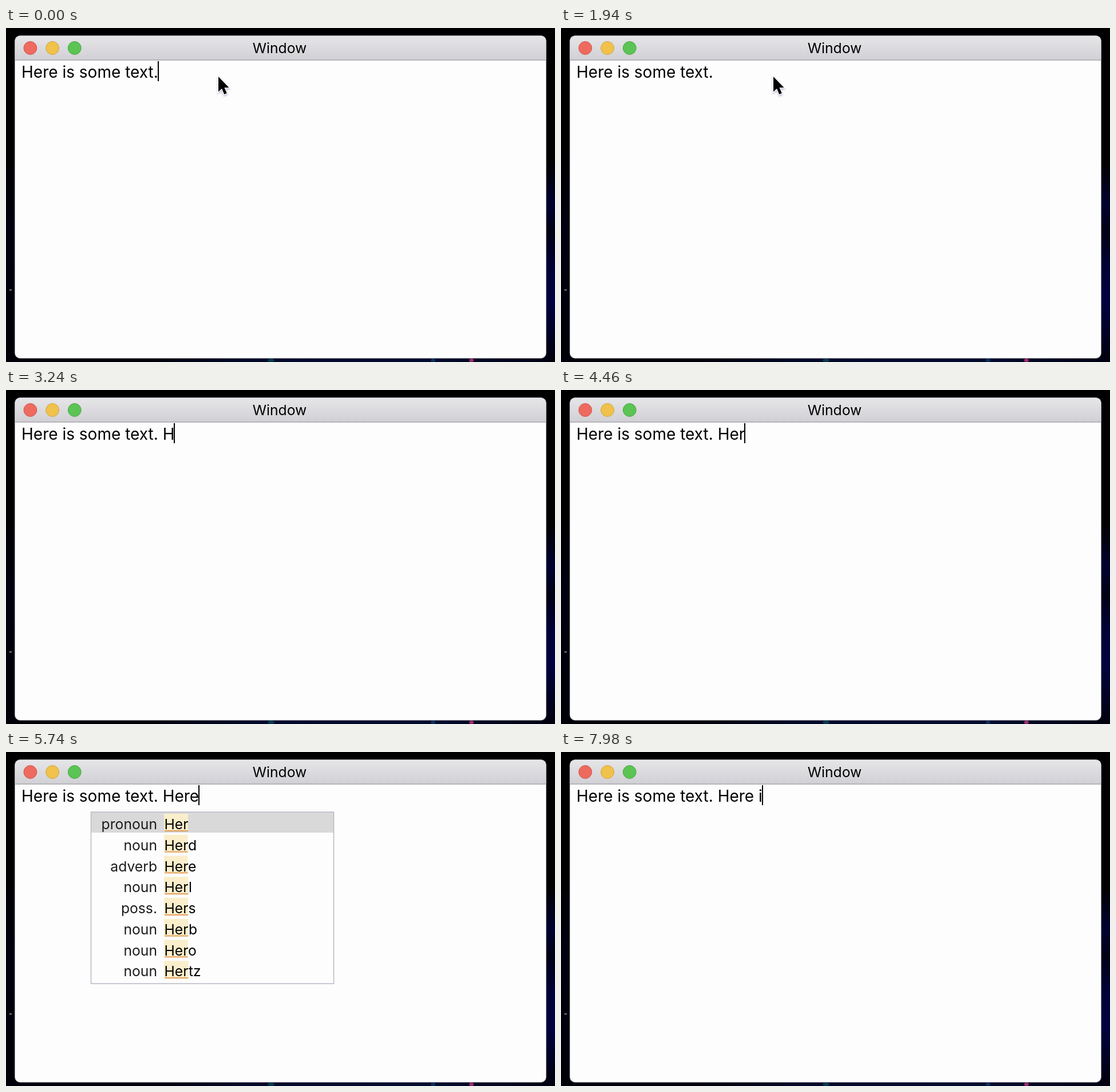
Write an HTML page that moves like this. It is 959x584 px and loops after 8000 ms.

```html
<!DOCTYPE html>
<html lang="en">
<head>
<meta charset="utf-8">
<title>Text completion</title>
<style>
  html, body { margin: 0; width: 100%; height: 100%; overflow: hidden; background: #000; }
  svg { display: block; width: 959px; height: 584px; }
  text { font-family: Inter, Roboto, sans-serif; font-optical-sizing: none; white-space: pre; }
  .title, .word { font-size: 24.7px; }
  .kind { font-size: 24.7px; fill: #1c1c1c; text-anchor: end; }
  #typed { font-size: 28px; }
</style>
</head>
<body>
<svg id="stage" viewBox="0 0 959 584">
  <defs>
    <linearGradient id="bar" x2="0" y2="1">
      <stop stop-color="#e6e5e8"/><stop offset="1" stop-color="#d1d0d4"/>
    </linearGradient>
    <linearGradient id="sky" x2="0" y2="1">
      <stop offset=".4" stop-color="#000"/><stop offset=".53" stop-color="#000030"/>
      <stop offset=".61" stop-color="#000014"/><stop offset=".72" stop-color="#000038"/>
      <stop offset=".82" stop-color="#000040"/><stop offset="1" stop-color="#00000c"/>
    </linearGradient>
    <linearGradient id="dusk" x2="0" y2="1">
      <stop offset=".35" stop-color="#000"/><stop offset=".6" stop-color="#000010"/>
      <stop offset="1" stop-color="#000008"/>
    </linearGradient>
    <linearGradient id="floor">
      <stop offset=".25" stop-color="#00000a"/><stop offset=".45" stop-color="#00082a"/>
      <stop offset=".8" stop-color="#000a2c"/><stop offset="1" stop-color="#000014"/>
    </linearGradient>
    <filter id="shade" x="-50%" y="-50%" width="200%" height="200%">
      <feDropShadow dx="0" dy="2" stdDeviation="1.5" flood-color="#77a" flood-opacity=".55"/>
    </filter>
  </defs>

  <rect width="959" height="584" fill="#000"/>
  <rect x="943" width="16" height="584" fill="url(#sky)"/>
  <rect width="16" height="584" fill="url(#dusk)"/>
  <rect x="16" y="570" width="927" height="14" fill="url(#floor)"/>
  <ellipse cx="8" cy="458" rx="2.5" ry="1.2" fill="#777"/>
  <ellipse cx="463" cy="581" rx="6" ry="3" fill="#063a4c"/>
  <ellipse cx="746" cy="581" rx="4" ry="3" fill="#0a2f5c"/>
  <ellipse cx="813" cy="581" rx="4" ry="3" fill="#a02c68"/>

  <rect x="15.5" y="13.5" width="928" height="564" rx="9" fill="#fdfdfd"/>
  <path d="M15.5 56V22.500a9 9 0 0 1 9-9H934.500a9 9 0 0 1 9 9V56Z" fill="url(#bar)"/>
  <rect x="16" y="55" width="927" height="2" fill="#b5b4bd"/>
  <rect x="15.500" y="13.500" width="928" height="564" rx="9" fill="none" stroke="#a9a9b4" stroke-opacity=".6"/>
  <g id="lights"></g>
  <text class="title" x="478" y="44" text-anchor="middle">Window</text>

  <text id="typed" x="27" y="87"></text>
  <rect id="caret" y="58" width="2" height="35"/>
  <g id="popups"></g>
  <path id="pointer" d="M371 85V111.500L377 106L381.300 116L385.800 114L381.500 104.300H389.500Z"
        stroke="#fff" stroke-width="2.500" paint-order="stroke" filter="url(#shade)"/>
</svg>
<script>
const LOOP = 8000, BLINK = 560, LEFT = 27;
const BASE = "Here is some text.";

// Each keystroke: time, text added to BASE so far.
const KEYS = [
  [0, ""], [2500, " "], [2980, " H"], [3600, " He"], [4200, " Her"],
  [5640, " Here"], [7160, " Here "], [7700, " Here i"]
];

const POPUPS = [
  { from: 5080, to: 6160, prefix: "Her", rows: [
    ["pronoun", "Her"], ["noun", "Herd"], ["adverb", "Here"], ["noun", "Herl"],
    ["poss.", "Hers"], ["noun", "Herb"], ["noun", "Hero"], ["noun", "Hertz"]] },
  { from: 6160, to: 7160, prefix: "Here", rows: [
    ["adverb", "Here"], ["adverb", "Herein"], ["adverb", "Hereof"], ["noun", "Heresy"],
    ["adverb", "Hereat"], ["adverb", "Hereto"], ["adverb", "Hereby"], ["noun", "Heretic"]] }
];

const byId = id => document.getElementById(id);
const typed = byId("typed"), caret = byId("caret"), pointer = byId("pointer");

function add(parent, tag, attrs, content = "") {
  const node = document.createElementNS("http://www.w3.org/2000/svg", tag);
  for (const key in attrs) node.setAttribute(key, attrs[key]);
  node.textContent = content;
  return parent.appendChild(node);
}

const show = (node, on) => node.setAttribute("visibility", on ? "visible" : "hidden");

function buildPopup({ prefix, rows }) {
  const group = add(byId("popups"), "g", {});
  add(group, "rect", { x: 148.5, y: 104.5, width: 424, height: 301, fill: "#fdfdfd" });
  add(group, "rect", { x: 149, y: 105, width: 423, height: 36, fill: "#d9d9da" });
  add(group, "rect", { x: 148.5, y: 105, width: 424, height: 300, fill: "none",
    stroke: "#b9b9c6", "stroke-width": 1.5 });
  rows.forEach(([kind, word], i) => {
    const y = 135 + i * 36.75;
    add(group, "text", { class: "kind", x: 264, y }, kind);
    const label = add(group, "text", { class: "word", x: 276.5, y }, word);
    const width = label.getSubStringLength(0, prefix.length);
    const mark = add(group, "rect", { x: 276, y: y - 27, width, height: 29, fill: "#faeecb" });
    group.insertBefore(mark, label);
    add(group, "rect", { x: 277, y: y + 2, width: width - 1, height: 1.7, fill: "#de8f3c" });
  });
  return group;
}

[["#ee6a5f", "#d3544b"], ["#f0c24b", "#d2a438"], ["#5bc454", "#47a743"]].forEach(
  ([fill, stroke], i) =>
    add(byId("lights"), "circle", { cx: 42.4 + i * 38.7, cy: 35, r: 11.4, fill, stroke }));

const groups = POPUPS.map(buildPopup);

function draw(t) {
  const [since, tail] = KEYS.findLast(([at]) => at <= t);
  const text = BASE + tail;
  if (typed.textContent !== text) {
    typed.textContent = text;
    caret.setAttribute("x", Math.round(LEFT + typed.getComputedTextLength()) - 1);
  }
  show(caret, Math.floor((t - since) / BLINK) % 2 === 0);
  show(pointer, t < KEYS[1][0]);
  POPUPS.forEach(({ from, to }, i) => show(groups[i], t >= from && t < to));
}

const start = performance.now();
function tick() {
  draw((performance.now() - start) % LOOP);
  requestAnimationFrame(tick);
}
tick();
</script>
</body>
</html>
```
